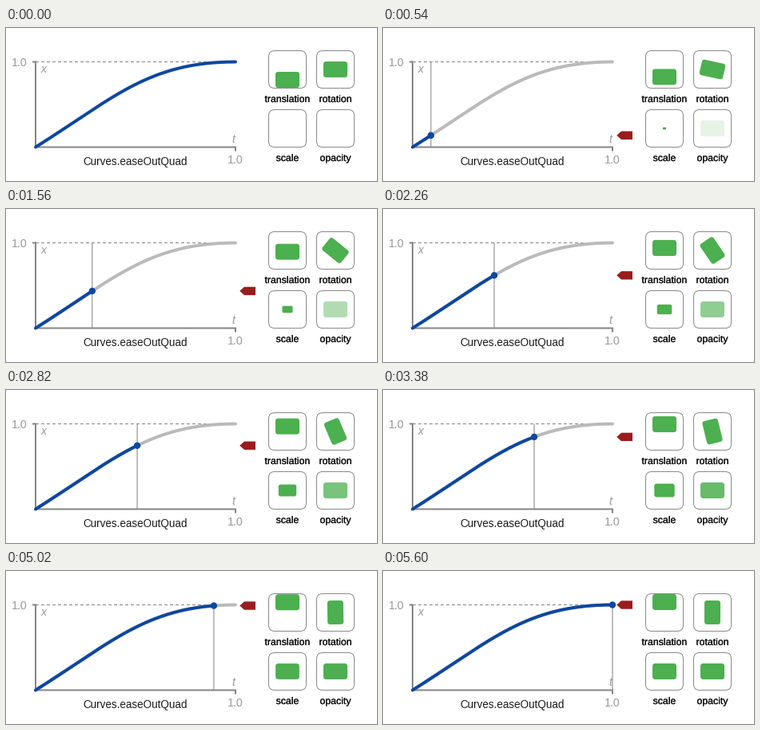
Recreate the animation shown at these times as a matplotlib script. Size 464x192 px, loop 5620 ms.

```python
import numpy as np
import matplotlib.pyplot as plt
from matplotlib.animation import FuncAnimation
from matplotlib.patches import Circle, FancyBboxPatch, Polygon
from matplotlib.patheffects import withStroke
from matplotlib.transforms import Affine2D

W, H, DPI = 464, 192, 64
PX = 72 / DPI  # points per pixel
TICK, TICKS, STEPS = 20, 281, 120
LEFT, RIGHT, TOP, BOTTOM = 37, 287, 42.5, 149.5
GREEN, BLUE, RED = "#4caf50", "#0d47a1", "#9b1c1c"
AXIS, PALE, LABEL = "#858585", "#bababa", "#999999"

plt.rcParams["font.family"] = "Liberation Sans"
fig = plt.figure(figsize=(W / DPI, H / DPI), dpi=DPI, facecolor="white")
ax = fig.add_axes([0, 0, 1, 1])
ax.set(xlim=(0, W), ylim=(H, 0))
ax.axis("off")


def bezier(a, b, s):
    return 3 * a * s * (1 - s) ** 2 + 3 * b * s**2 * (1 - s) + s**3


S = np.linspace(0, 1, 1001)
CURVE_T = bezier(0.39, 0.565, S)
CURVE_V = bezier(0.575, 1.0, S)


def ease(t):
    return np.interp(t, CURVE_T, CURVE_V)


def to_px(t):
    return LEFT + (RIGHT - LEFT) * t, BOTTOM - (BOTTOM - TOP) * ease(t)


def line(xs, ys, color, width, **kw):
    kw.setdefault("solid_capstyle", "butt")
    return ax.plot(xs, ys, color=color, lw=width * PX, snap=False, **kw)[0]


def label(x, y, text, size, color, ha="center", **kw):
    return ax.text(x, y, text, fontsize=size * PX, color=color, ha=ha,
                   va="baseline", **kw)


def rounded(x, y, w, h, r, **kw):
    box = FancyBboxPatch((x, y), w, h,
                         boxstyle=f"round,pad=0,rounding_size={r}", **kw)
    return ax.add_patch(box)


def tile(cx, cy, name):
    frame = rounded(cx - 23.5, cy - 23.5, 47, 47, 7.5, fc="none",
                    ec="#8a8a8a", lw=PX, zorder=1)
    label(cx, cy + 41, name, 12.3, "#111111",
          path_effects=[withStroke(linewidth=0.2 * PX, foreground="#111111")])
    block = rounded(-15, -10, 30, 20, 3.5, fc=GREEN, ec="none", zorder=2)
    block.set_clip_path(frame)
    return block


def place(block, cx, cy, scale=1, angle=0):
    move = Affine2D().scale(scale).rotate_deg(angle).translate(cx, cy)
    block.set_transform(move + ax.transData)


# Chart
line([LEFT, RIGHT], [TOP, TOP], AXIS, 1, dashes=(4, 3), zorder=1)
line([LEFT, LEFT], [TOP - 1, BOTTOM + 1], AXIS, 2, zorder=1)
line([LEFT, RIGHT + 1], [BOTTOM, BOTTOM], AXIS, 2, zorder=1)
line([LEFT - 4, LEFT], [TOP, TOP], AXIS, 2, zorder=1)
line([RIGHT, RIGHT], [BOTTOM, BOTTOM + 5], AXIS, 2, zorder=1)
label(27, 48, "1.0", 14.3, LABEL, ha="right")
label(287, 170.5, "1.0", 14.3, LABEL)
label(47, 56, "x", 14, LABEL, style="italic")
label(284.3, 144, "t", 14.5, LABEL, style="italic")
label(161.2, 172, "Curves.easeOutQuad", 13.55, "#1a1a1a")

track = line(*to_px(np.linspace(0, 1, 251)), PALE, 4,
             solid_capstyle="round", zorder=3)
guide = line([], [], "#8c8c8c", 1.1, zorder=4)
trace = line([], [], BLUE, 4, solid_capstyle="round", zorder=5)
dot = ax.add_patch(Circle((0, 0), 4.2, fc=BLUE, ec="none", zorder=6))
arrow = ax.add_patch(Polygon([(0, 0), (1, 1)], fc=RED, ec="none", zorder=6))
ARROW = np.array([(292.3, 0), (298, -5.2), (312, -5.2), (312, 5.2), (298, 5.2)])

# Samples
mover = tile(352, 52, "translation")
turner = tile(412, 52, "rotation")
scaler = tile(352, 126, "scale")
fader = tile(412, 126, "opacity")
place(fader, 412, 126)


def step_at(tick):
    """Poses come in threes, held for 5, 1 and 1 ticks."""
    if tick == 0:
        return 0
    n, r = divmod(tick - 1, 7)
    return 1 + 3 * n + max(0, r - 4)


def draw(tick):
    t = step_at(tick) / STEPS
    v = ease(t)
    running = t > 0
    x, y = to_px(t)

    trace.set_data(*to_px(np.linspace(0, t if running else 1, 251)))
    guide.set_data([x, x], [TOP, BOTTOM])
    dot.center = x, y
    arrow.set_xy(ARROW + (0, y))
    for part in (track, guide, dot, arrow, scaler):
        part.set_visible(running)

    place(mover, 352, 65 - 26 * v)
    place(turner, 412, 52, angle=90 * v)
    place(scaler, 352, 126, scale=max(v, 1e-3))
    fader.set_alpha(float(v))
    return []


anim = FuncAnimation(fig, draw, frames=TICKS, interval=TICK, repeat=True,
                     repeat_delay=0, blit=False)
plt.show()
```
